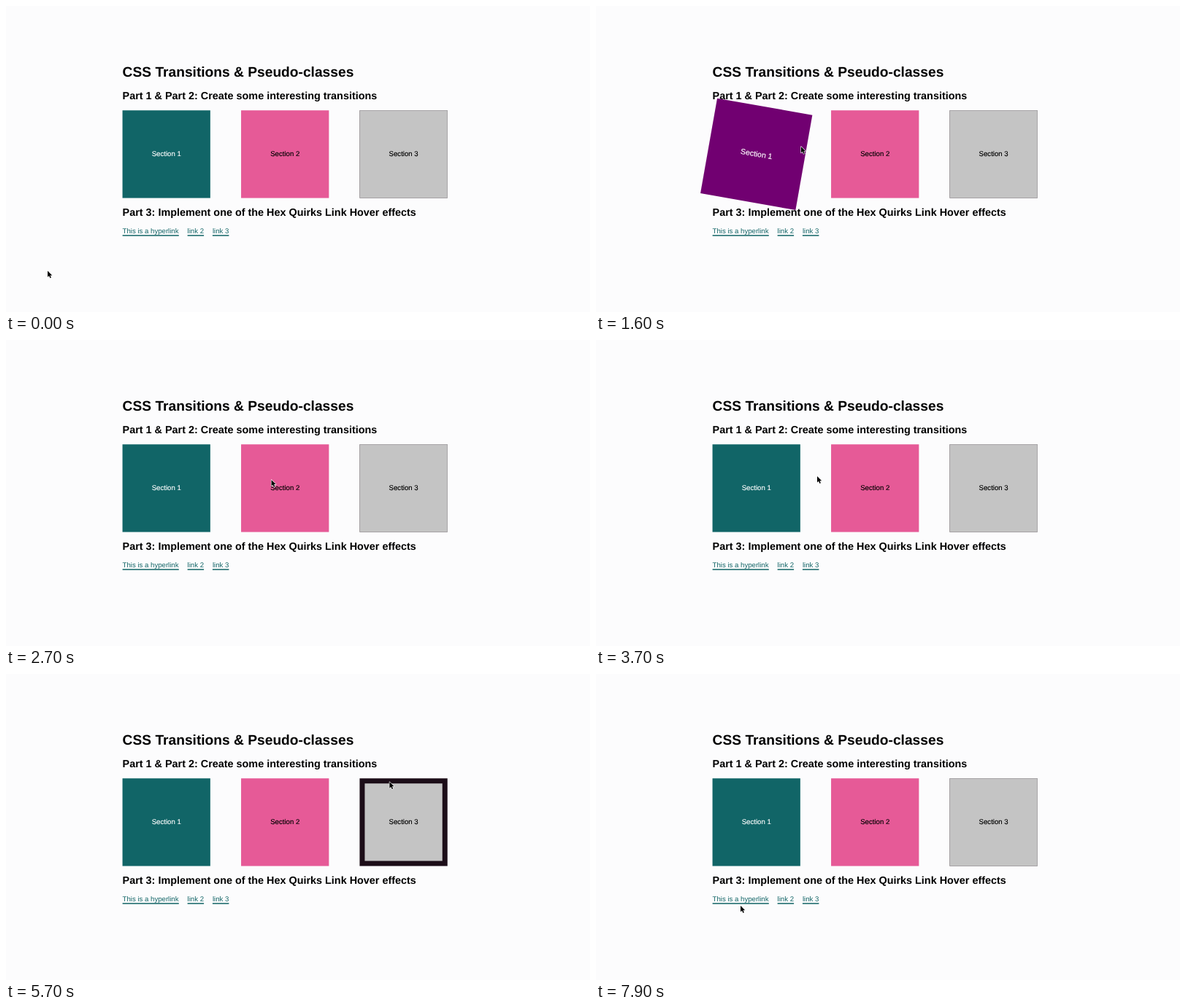
An HTML page that plays this animation: 800 px wide and 420 px high, repeating every 8000 ms.

```html
<!DOCTYPE html>
<html lang="en">
<head>
<meta charset="utf-8">
<title>CSS Transitions</title>
<style>
  html, body { margin: 0; width: 100%; height: 100%; overflow: hidden; background: #fcfcfd; }
  svg { display: block; text-rendering: geometricPrecision; font: 9.62px "Liberation Sans", Arial, sans-serif; }
  .title { font-weight: bold; font-size: 19.2px; }
  .part { font-weight: bold; font-size: 14.4px; }
  .box text { text-anchor: middle; stroke: currentColor; stroke-width: .15px; }
  .link { fill: #116466; }
</style>
</head>
<body>
<svg width="800" height="420" viewBox="0 0 800 420">
  <defs><rect id="square" x="-60.15" y="-60.15" width="120.3" height="120.3"/></defs>
  <text class="title" x="159.6" y="97">CSS Transitions &amp; Pseudo-classes</text>
  <text class="part" x="159.6" y="128">Part 1 &amp; Part 2: Create some interesting transitions</text>
  <text class="part" x="159.6" y="288">Part 3: Implement one of the Hex Quirks Link Hover effects</text>
  <g class="link">
    <text x="159.6" y="312.1">This is a hyperlink</text>
    <text x="248.6" y="312.1">link 2</text>
    <text x="282.9" y="312.1">link 3</text>
    <path d="M159.6 315h77.2M248.6 315h22.5M282.9 315h22.5" stroke="#116466" stroke-width="1.6"/>
  </g>
  <g class="box" transform="translate(382.2 203.4)">
    <use href="#square" fill="#e65a97"/>
    <text y="2.9">Section 2</text>
  </g>
  <g class="box" transform="translate(544.6 203.4)">
    <use href="#square" fill="#1c0d18"/>
    <use id="face" href="#square" fill="#c4c4c4"/>
    <text y="2.9">Section 3</text>
  </g>
  <g class="box" id="spinner" color="#fff">
    <use id="tile" href="#square"/>
    <text y="2.9" fill="#fff">Section 1</text>
  </g>
  <path id="cursor" d="M0 0V8.6L2 6.8L3.4 10L4.9 9.3L3.5 6.2H6.2Z" stroke="#fff" stroke-width="1.2" stroke-linejoin="round" paint-order="stroke"/>
</svg>
<script>
const LOOP = 8000, STEP = 100, FADE = 200, SIDE = 120.3, BORDER = 7;
const $ = id => document.getElementById(id);

// Pointer stops: time, x, y
const stops = [
  [0, 57, 363.5], [700, 178, 203.5], [1900, 300, 191], [2600, 365, 192],
  [3700, 303, 187], [4450, 390, 97], [5200, 524, 144], [6000, 526, 150],
  [6400, 530, 97], [6900, 713, 200], [7200, 375, 413], [7900, 198, 318]
];

const mix = (a, b, k) => a + (b - a) * k;
const smooth = k => k * k * (3 - 2 * k);
const easeOut = k => 1 - (1 - Math.min(1, Math.max(0, k))) ** 2.3;
const hover = (t, enter, leave) => easeOut((t - enter) / FADE) - easeOut((t - leave) / FADE);

function pointerAt(t) {
  const i = Math.max(1, stops.findIndex(s => s[0] >= t));
  const [[t0, x0, y0], [t1, x1, y1]] = stops.slice(i - 1, i + 1);
  const k = smooth((t - t0) / (t1 - t0));
  return [mix(x0, x1, k), mix(y0, y1, k)];
}

function draw(t) {
  const spin = hover(t, 480, 1700);
  $("spinner").setAttribute("transform",
    `translate(219.7 203.4) rotate(${10 * spin}) scale(${1 + 0.1 * spin})`);
  $("tile").setAttribute("fill",
    `rgb(${mix(17, 113, spin)},${mix(101, 0, spin)},${mix(103, 113, spin)})`);

  const border = BORDER * hover(t, 5080, 6120);
  $("face").setAttribute("transform", `scale(${1 - 2 * border / SIDE})`);

  $("cursor").setAttribute("transform", `translate(${pointerAt(t)})`);
}

function tick() {
  draw(Math.floor(performance.now() % LOOP / STEP) * STEP);
  requestAnimationFrame(tick);
}
tick();
</script>
</body>
</html>
```
